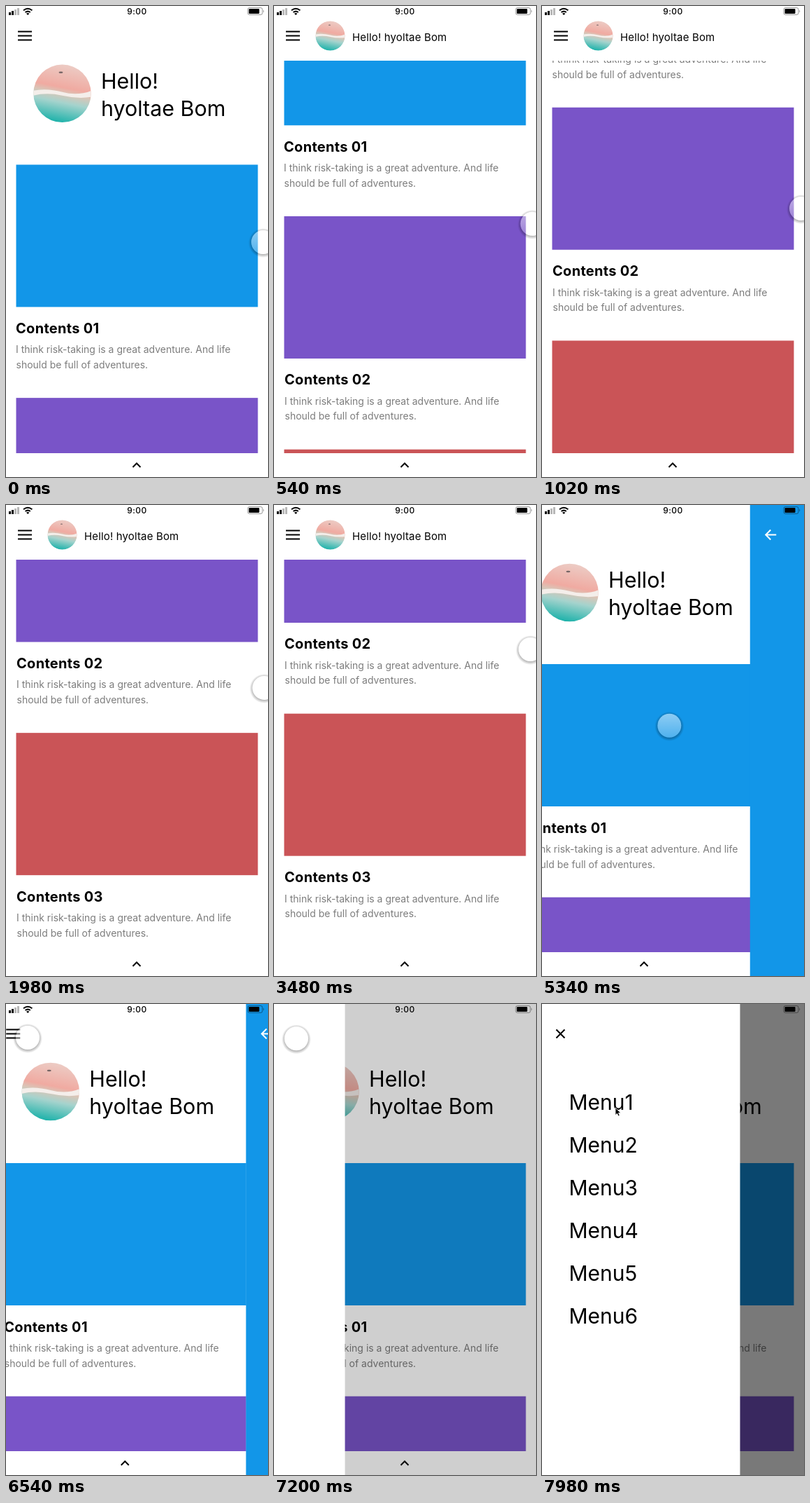
An HTML page that plays this animation: 375x672 px, repeating every 8 s.

```html
<!DOCTYPE html>
<html lang="en">
<head>
<meta charset="utf-8">
<title>Scrolling app prototype</title>
<style>
  html, body { margin: 0; width: 100%; height: 100%; overflow: hidden; background: #fff; }
  svg { display: block; }
  text { font-family: Inter, Roboto, sans-serif; }
  .title { font-size: 20px; font-weight: 700; letter-spacing: .3px; }
  .body { font-size: 14px; fill: #7d7d7d; }
  .big { font-size: 30.5px; }
  .small { font-size: 15px; letter-spacing: .15px; }
  .menu { font-size: 30px; }
  .clock { font-size: 12px; font-weight: 500; letter-spacing: .5px; text-anchor: middle; }
  .line { fill: none; stroke: #000; stroke-width: 2; }
</style>
</head>
<body>
<svg width="375" height="672" viewBox="0 0 375 672">
  <defs>
    <linearGradient id="beach" x1=".6" x2=".4" y2="1">
      <stop offset="0" stop-color="#eccdc6"/>
      <stop offset=".4" stop-color="#f0aaa1"/>
      <stop offset=".5" stop-color="#d8c6b8"/>
      <stop offset=".65" stop-color="#a5d3cd"/>
      <stop offset="1" stop-color="#16b0a8"/>
    </linearGradient>
    <linearGradient id="glass" x2="0" y2="1">
      <stop offset="0" stop-color="#fff" stop-opacity=".52"/>
      <stop offset="1" stop-color="#fff" stop-opacity=".26"/>
    </linearGradient>
    <radialGradient id="shade">
      <stop offset=".78" stop-opacity=".28"/>
      <stop offset="1" stop-opacity="0"/>
    </radialGradient>
    <clipPath id="round"><circle r="41.3"/></clipPath>
    <mask id="ring" maskUnits="userSpaceOnUse" x="-24" y="-24" width="48" height="48">
      <rect x="-24" y="-24" width="48" height="48" fill="#fff"/>
      <circle r="17"/>
    </mask>
  </defs>

  <g id="home">
    <rect width="375" height="672" fill="#fff"/>
    <g id="list"></g>
    <rect id="header" width="375" fill="#fff"/>
    <path class="line" d="M17 36.5h20m-20 6h20m-20 6h20"/>
    <g id="avatar" clip-path="url(#round)">
      <circle r="42" fill="url(#beach)"/>
      <path d="M-42-4Q-22-8 0-2T42-4V5Q22 8 0 3T-42 3Z" fill="#f4eeea"/>
      <ellipse cx="-2" cy="-30" rx="3" ry="1.3" fill="#766"/>
    </g>
    <g id="greeting" class="big"><text y="-7">Hello!</text><text y="32">hyoltae Bom</text></g>
    <text id="compact" class="small" x="112" y="49.5">Hello! hyoltae Bom</text>
    <rect y="638" width="375" height="34" fill="#fff"/>
    <path class="line" d="M181.5 658l5.5-5.5l5.5 5.5"/>
  </g>

  <g id="detail">
    <rect width="376" height="672" fill="#1296e8"/>
    <path class="line" style="stroke:#fff" d="M37.5 42.5h-15m7-7l-7 7l7 7"/>
  </g>

  <g id="status">
    <path d="M4 9h3v4h-3zm4-2h3v6h-3z"/>
    <path d="M12 5h3v8h-3zm4-2h3v10h-3z" fill="#b8b8b8"/>
    <path class="line" d="M25 6.2q6.2-5 12.4 0M27.6 9q3.6-2.8 7.2 0"/>
    <path d="M29 10.8q2.2-1.5 4.4 0l-2.2 2.2z"/>
    <text class="clock" x="187.5" y="11.5">9:00</text>
    <rect x="346" y="2.5" width="21" height="10" rx="2.5" fill="none" stroke="#000" stroke-opacity=".4"/>
    <rect x="347.5" y="4" width="15" height="7" rx="1"/>
    <path d="M368.3 5.5q2 2 0 4z" fill-opacity=".4"/>
  </g>

  <rect id="dim" width="375" height="672"/>
  <g id="menu">
    <rect x="-60" width="344" height="672" fill="#fff"/>
    <path class="line" d="M21 36.500l12 12m0-12l-12 12"/>
  </g>

  <g id="touch">
    <circle r="21" cy="1" fill="url(#shade)" mask="url(#ring)"/>
    <circle r="17" fill="url(#glass)"/>
  </g>
  <path id="cursor" d="M0 0v10.500l2.500-2.200l1.700 3.700l2-.9l-1.700-3.600h3.300z" stroke="#fff" stroke-width=".8"/>
</svg>
<script>
const LOOP = 8000;
const PUSH = 5304, POP = 6260, MENU = 7150, SCROLL_BACK = 3480;
const SCROLL_END = 596, COLLAPSE_DISTANCE = 207, BLOCK_PITCH = 332.7;

const $ = id => document.getElementById(id);
const clamp = x => Math.max(0, Math.min(1, x));
const mix = (a, b, k) => a + (b - a) * k;
const easeOut = (t, start, duration) => 1 - (1 - clamp((t - start) / duration)) ** 3;
const place = (id, x, y, scale = 1) =>
  $(id).setAttribute('transform', `translate(${x} ${y}) scale(${scale})`);

// Damped spring from 0 to 1 with a slight overshoot.
const spring = ms => ms <= 0 ? 0 : 1 - Math.exp(-.0074 * ms) * Math.cos(.007 * ms);

// Where the finger rests; it eases from one stop to the next.
const stops = [
  { at: 0, x: 368, y: 337 },
  { at: 1020, x: 371, y: 289 },
  { at: SCROLL_BACK, x: 367, y: 206 },
  { at: 4080, x: 359, y: 292 },
  { at: PUSH, x: 183, y: 316 },
  { at: POP, x: 31, y: 48 },
  { at: MENU, x: 31, y: 48 },
  { at: 7900, x: 105, y: 148 },
];

function finger(t) {
  const next = stops.findIndex(stop => stop.at > t);
  if (next < 0) return stops.at(-1);
  const from = stops[next - 1], to = stops[next];
  const u = (t - from.at) / (to.at - from.at);
  const k = u * u * (3 - 2 * u);
  return { x: mix(from.x, to.x, k), y: mix(from.y, to.y, k) };
}

$('list').innerHTML = ['#1296e8', '#7954c8', '#ca5457'].map((color, i) => {
  const x = i ? 15 : 14;
  return `<g transform="translate(0 ${227 + i * BLOCK_PITCH})">
    <rect x="14.500" width="346" height="203" fill="${color}"/>
    <text class="title" x="${x}" y="240.500">Contents 0${i + 1}</text>
    <text class="body" x="${x}" y="269">I think risk-taking is a great adventure. And life</text>
    <text class="body" x="${x + .5}" y="290.500">should be full of adventures.</text></g>`;
}).join('');

$('menu').innerHTML += Array.from({ length: 6 }, (_, i) =>
  `<text class="menu" x="39" y="${151 + 61 * i}">Menu${i + 1}</text>`).join('');

function draw(t) {
  const scroll = SCROLL_END * (easeOut(t, 0, 3115) - easeOut(t, SCROLL_BACK, 1395));
  const collapse = clamp(scroll / COLLAPSE_DISTANCE);
  const centerY = mix(125, 42.5, collapse), scale = mix(1, .51, collapse);
  place('list', 0, -scroll);
  $('header').setAttribute('height', mix(205, 78, collapse));
  place('avatar', 80.5, centerY, scale);
  place('greeting', mix(136, 112.5, collapse), centerY, scale);
  $('greeting').setAttribute('opacity', clamp(1 - 1.4 * collapse));
  $('compact').setAttribute('opacity', clamp((collapse - .7) / .3));

  const push = easeOut(t, PUSH, 500) - easeOut(t, POP, 500);
  place('home', -199 * push, 0);
  place('detail', 375 * (1 - push), 0);

  const open = spring(t - MENU);
  place('menu', 284 * (open - 1), 0);
  $('dim').setAttribute('opacity', .525 * clamp(open));

  const { x, y } = finger(t), pointing = t > MENU + 70;
  place('touch', x, y);
  place('cursor', x, y);
  $('touch').style.display = pointing ? 'none' : '';
  $('cursor').style.display = pointing ? '' : 'none';
}

const start = performance.now();
function tick() {
  draw((performance.now() - start) % LOOP);
  requestAnimationFrame(tick);
}
tick();
</script>
</body>
</html>
```
